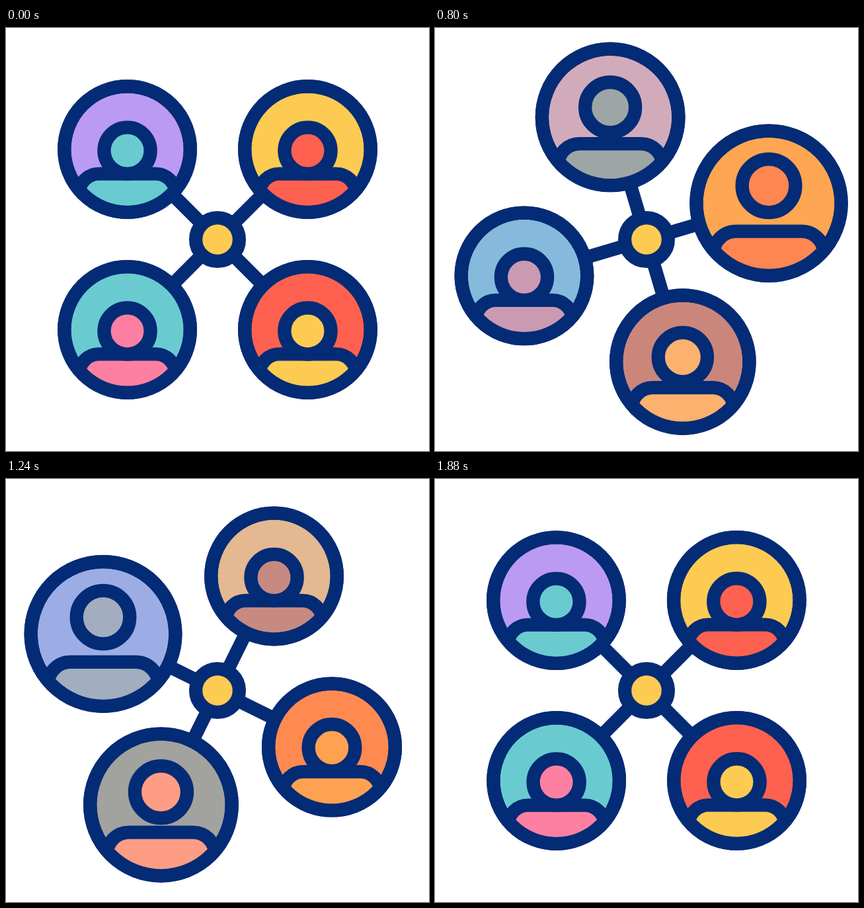
An HTML page with a canvas for the animation above (1920 ms loop, 640 px wide and 640 px high).

```html
<!DOCTYPE html>
<html lang="en">
<head>
<meta charset="utf-8">
<title>People network</title>
<style>
  html, body { margin: 0; width: 100%; height: 100%; overflow: hidden; background: #fff; }
  canvas { display: block; width: 100vmin; height: 100vmin; }
</style>
</head>
<body>
<canvas id="stage" width="640" height="640"></canvas>
<script>
const ctx = document.getElementById('stage').getContext('2d');

const STEP = 40, STEPS = 48;
const MID = 320, ORBIT = 193, RING = 95.3, LINE = 20.3;
const NAVY = '#042b75';
const PURPLE = [187, 154, 243], TEAL = [105, 203, 208], YELLOW = [253, 203, 82];
const RED = [255, 97, 80], PINK = [253, 128, 163];

// Clockwise from top left. pop: rise start, rise end, fall start, fall end (in steps).
const people = [
  { back: PURPLE, skin: TEAL,   pop: [2.6, 13.6, 14.5, 26.9],  grow: 0.143, lift: 27 },
  { back: YELLOW, skin: RED,    pop: [7.8, 18.7, 22, 32.3],    grow: 0.15,  lift: 25 },
  { back: RED,    skin: YELLOW, pop: [15.4, 26.4, 28.2, 39.2], grow: 0.15,  lift: 23 },
  { back: TEAL,   skin: PINK,   pop: [21.6, 31.8, 34.2, 45],   grow: 0.15,  lift: 24.5 }
];

const ramp = (x, a, b) => Math.min(1, Math.max(0, (x - a) / (b - a)));
const smooth = u => u * u * (3 - 2 * u);
const mix = (a, b, k) => `rgb(${a.map((v, i) => Math.round(v + (b[i] - v) * k))})`;

// cubic-bezier(.57, 0, .43, 1)
function turn(x) {
  let lo = 0, hi = 1;
  for (let i = 0; i < 30; i++) {
    const t = (lo + hi) / 2, r = 1 - t;
    const bx = 3 * r * r * t * 0.57 + 3 * r * t * t * 0.43 + t * t * t;
    if (bx < x) lo = t; else hi = t;
  }
  return smooth(lo);
}

function disc(x, y, r, fill, width) {
  ctx.beginPath();
  ctx.arc(x, y, r, 0, Math.PI * 2);
  ctx.fillStyle = fill;
  ctx.fill();
  ctx.lineWidth = width;
  ctx.stroke();
}

function shoulders(fill, width) {
  ctx.beginPath();
  ctx.moveTo(-73, 120);
  ctx.lineTo(-73, 67);
  ctx.arc(-43, 67, 30, Math.PI, Math.PI * 1.5);
  ctx.arc(43, 67, 30, Math.PI * 1.5, Math.PI * 2);
  ctx.lineTo(73, 120);
  ctx.fillStyle = fill;
  ctx.fill();
  ctx.lineWidth = width;
  ctx.stroke();
}

function avatar(person, next, x, y, step, blend) {
  const [a, b, c, d] = person.pop;
  const up = smooth(ramp(step, a, b)) * (1 - smooth(ramp(step, c, d)));
  const scale = 1 + person.grow * up;
  const width = LINE / scale;
  const back = mix(person.back, next.back, blend);
  const skin = mix(person.skin, next.skin, blend);

  ctx.save();
  ctx.translate(x, y);
  ctx.scale(scale, scale);
  disc(0, 0, RING, back, width);
  ctx.save();
  ctx.beginPath();
  ctx.arc(0, 0, RING, 0, Math.PI * 2);
  ctx.clip();
  shoulders(skin, width);
  ctx.restore();
  disc(0, 2 - person.lift * up, 35.1, skin, width);
  ctx.beginPath();
  ctx.arc(0, 0, RING, 0, Math.PI * 2);
  ctx.lineWidth = width;
  ctx.stroke();
  ctx.restore();
}

function draw(step) {
  const angle = turn(step / STEPS) * Math.PI / 2;
  const blend = ramp(step, 6, 46.5);
  const spots = people.map((_, i) => {
    const at = angle + (i * 2 - 3) * Math.PI / 4;
    return [MID + ORBIT * Math.cos(at), MID + ORBIT * Math.sin(at)];
  });

  ctx.fillStyle = '#fff';
  ctx.fillRect(0, 0, 640, 640);
  ctx.strokeStyle = NAVY;
  ctx.lineWidth = LINE;
  for (const [x, y] of spots) {
    ctx.beginPath();
    ctx.moveTo(MID, MID);
    ctx.lineTo(x, y);
    ctx.stroke();
  }
  people.forEach((p, i) => avatar(p, people[(i + 1) % 4], ...spots[i], step, blend));
  disc(MID, MID, 32.9, mix(YELLOW, YELLOW, 0), LINE);
}

function tick() {
  draw(Math.floor((performance.now() + 4) / STEP) % STEPS);
  requestAnimationFrame(tick);
}
tick();
</script>
</body>
</html>
```
